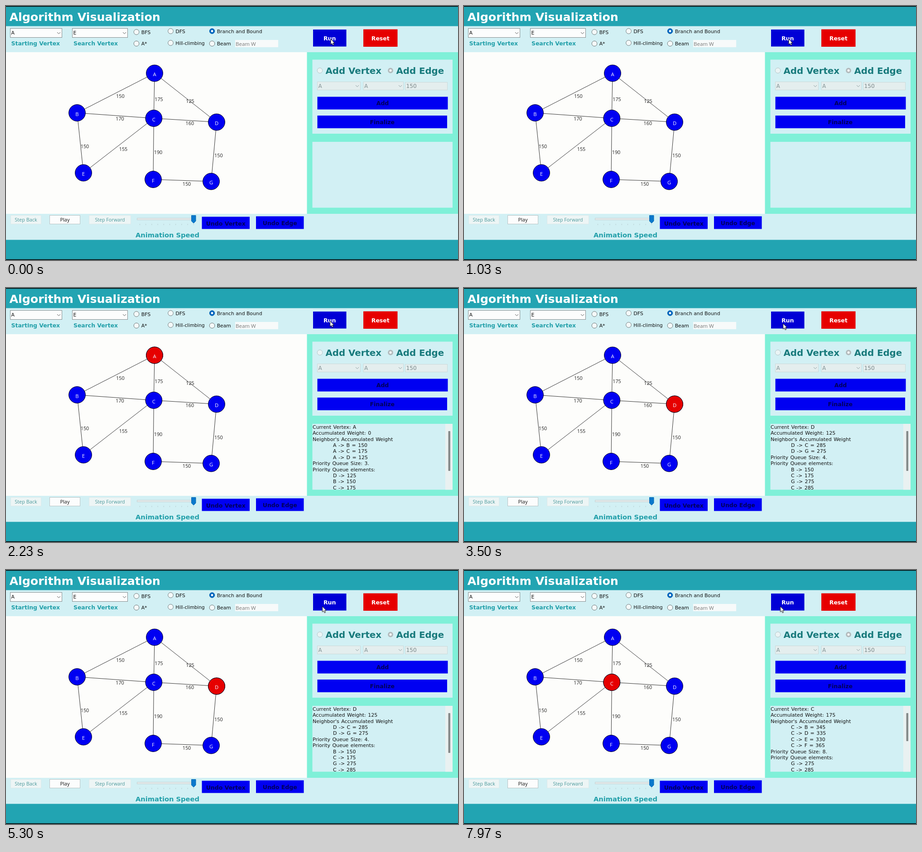
Animation, 998 px wide and 561 px high, one loop 8000 ms. Source, as an HTML page:

```html
<!DOCTYPE html>
<html lang="en">
<head>
<meta charset="utf-8">
<title>Algorithm Visualization</title>
<style>
html, body { margin: 0; width: 100%; height: 100%; overflow: hidden; background: #000; }
svg { display: block; width: 998px; height: 561px; }
text { font-family: "DejaVu Sans", sans-serif; white-space: pre; }
.bold { font-weight: bold; }
.ui { font-family: "Open Sans", "Noto Sans", sans-serif; }
.mid { text-anchor: middle; }
.log { word-spacing: 1px; }
.state { visibility: hidden; animation: 8s step-end infinite; }
#stateA { animation-name: showA; }
#stateD { animation-name: showD; }
#stateB { animation-name: showB; }
#stateC { animation-name: showC; }
@keyframes showA { 0% { visibility: hidden } 17.5% { visibility: visible } 42.5%, 100% { visibility: hidden } }
@keyframes showD { 0% { visibility: hidden } 42.5% { visibility: visible } 67.5%, 100% { visibility: hidden } }
@keyframes showB { 0% { visibility: hidden } 67.5% { visibility: visible } 92.5%, 100% { visibility: hidden } }
@keyframes showC { 0% { visibility: hidden } 92.5%, 100% { visibility: visible } }
#cursor { animation: drift 8s linear infinite; }
@keyframes drift {
  0%, 17% { transform: translate(717px, 73px) }
  22%, 30% { transform: translate(715.5px, 73px) }
  42%, 44% { transform: translate(704.5px, 78.5px) }
  52%, 100% { transform: translate(698.5px, 80.5px) }
}
</style>
</head>
<body>
<svg id="stage" viewBox="0 0 998 561"></svg>
<script>
const TEAL = '#22a4b2', PALE = '#d2f0f4', MINT = '#7ff0d8', BLUE = '#0000f2', RED = '#e60000';
const INK = '#111', LABEL = '#219fa9', FADED = '#8a9a9c', NAVY = '#00005c';

const box = (x1, y1, x2, y2, fill, extra = '') =>
  `<rect x="${x1}" y="${y1}" width="${x2 - x1}" height="${y2 - y1}" fill="${fill}" ${extra}/>`;
const text = (x, y, size, str, fill = INK, cls = '') =>
  `<text x="${x}" y="${y}" font-size="${size}" fill="${fill}" class="${cls}">${str.replace(/>/g, '&gt;')}</text>`;
const path = (d, stroke, fill = 'none') => `<path d="${d}" stroke="${stroke}" fill="${fill}"/>`;
const ring = (x, y, r, fill, stroke, width = 1) =>
  `<circle cx="${x}" cy="${y}" r="${r}" fill="${fill}" stroke="${stroke}" stroke-width="${width}"/>`;

const combo = (x1, y1, x2, y2, value, size, fill, border, ink) =>
  box(x1 + .5, y1 + .5, x2 - .5, y2 - .5, fill, `stroke="${border}"`) +
  text(x1 + 2.5, (y1 + y2) / 2 + size * .37, size, value, ink) +
  path(`M${x2 - 11} ${(y1 + y2) / 2 - 1.5}l3.5 3.5 3.5 -3.5`, ink === INK ? '#555' : ink);

const radio = (x, y, label, size = 10.8, on = false) =>
  (on ? ring(x, y, 5.7, '#0067c0', '#005fb0') + ring(x, y, 2.4, '#fff', 'none')
      : ring(x, y, 5.8, '#f4fafa', '#70787a')) +
  text(x + 10.7, y + 4.3, size, label);

const button = (x1, y1, x2, y2, label, fill, ink, size = 12.5, cls = 'bold', border = 'none', dy = 0) =>
  box(x1 + .5, y1 + .5, x2 - .5, y2 - .5, fill, `stroke="${border}"`) +
  text((x1 + x2) / 2, (y1 + y2) / 2 + size * .36 + dy, size, label, ink, cls + ' mid');

function panels() {
  return box(0, 1.5, 998, 45, TEAL) + box(0, 44.5, 998, 102, PALE) +
    box(0, 102, 665, 459, '#fdfdfb') + box(664.5, 102, 998, 459, MINT) +
    box(676.5, 118.5, 986, 282, PALE) + box(676.5, 300, 986, 445.5, PALE) +
    box(0, 459, 998, 517, PALE) + box(0, 516.5, 998, 559.5, TEAL);
}

function toolbar() {
  return text(7.5, 33, 25.3, 'Algorithm Visualization', '#fff', 'bold') +
    combo(9, 49, 124, 70, 'A', 10.8, '#fcfdfd', '#858c8e', INK) +
    combo(146, 49, 269, 70, 'E', 10.8, '#fcfdfd', '#858c8e', INK) +
    text(11.5, 87, 12.45, 'Starting Vertex', LABEL, 'bold') +
    text(149, 87, 12.4, 'Search Vertex', LABEL, 'bold') +
    radio(288, 57.5, 'BFS', 11) + radio(288, 83, 'A*') +
    radio(363.5, 55.5, 'DFS', 11) + radio(363.5, 81.5, 'Hill-climbing', 10.4) +
    radio(455, 55.5, 'Branch and Bound', 10.8, true) + radio(455, 83, 'Beam') +
    box(506, 75, 601, 91, '#f7fafa') + text(507, 87.5, 11.5, 'Beam W', '#777', 'ui') +
    button(677.5, 51.5, 752, 90, 'Run', '#0000d6', '#fff', 12.6, 'bold', 'none', .7) +
    button(788.5, 51, 865, 90.5, 'Reset', RED, '#fff', 12.5, 'bold', 'none', .7);
}

function editor() {
  const ink = '#187a7c', field = '#e4eeee', rim = '#ccd9da';
  return ring(693, 142.5, 5.8, '#eaf4f5', '#b4c4c6') + text(705.5, 150.2, 19.8, 'Add Vertex', ink, 'bold') +
    ring(849, 142.5, 4.3, '#f4f6f6', '#b2babc', 3.2) +
    text(861.5, 150.2, 19.75, 'Add Edge', ink, 'bold') +
    combo(687, 167, 783, 186, 'A', 12, field, rim, FADED) +
    combo(788.5, 167, 878, 186, 'A', 12, field, rim, FADED) +
    box(881.5, 168.5, 974.5, 185.5, field, `stroke="${rim}"`) + text(883.5, 181.2, 12.2, '150', '#7d898b') +
    button(687, 200, 976, 229, 'Add', BLUE, NAVY) +
    button(687, 241.5, 974.5, 270.5, 'Finalize', BLUE, NAVY, 12.5, 'bold', 'none', .5);
}

function playback() {
  let ticks = '';
  for (let i = 0; i < 10; i++) ticks += `M${295.5 + i * 13.2} 481v3`;
  return button(10, 462, 78, 482, 'Step Back', '#edf5f5', '#4b999c', 10.9, 'ui', '#dde9ea') +
    button(96, 462, 164, 482, 'Play', '#fcfdfd', INK, 10.9, 'ui', '#b9c3c5') +
    button(183, 462, 276, 482, 'Step Forward', '#edf5f5', '#4b999c', 10.7, 'ui', '#dde9ea') +
    box(289.5, 468.5, 417.5, 472.5, '#e4eaea', 'stroke="#c6d2d4"') + path(ticks, '#b9cfd2') +
    path('M409.5 462.5h9.5v12.5l-4.75 4.8l-4.75 -4.8z', '#0a6cb4', '#0a78cc') +
    text(286, 511, 14.65, 'Animation Speed', LABEL, 'bold') +
    button(432, 465, 538.5, 493, 'Undo Vertex', BLUE, NAVY, 12.5, 'bold', 'none', 1) +
    button(551.5, 464, 658, 493, 'Undo Edge', BLUE, NAVY, 12.5, 'bold', 'none', .8);
}

const nodes = {
  A: [328, 148.5], B: [157, 236], C: [326.3, 248], D: [465, 256.5],
  E: [171, 368.5], F: [325, 383], G: [453, 387.5]
};
// pair, weight, label centre
const edges = [
  ['AB', 150, 252.3, 199], ['AC', 175, 337.5, 206], ['AD', 125, 406.5, 210], ['BC', 170, 251.5, 249],
  ['CD', 160, 405.8, 259], ['BE', 150, 174, 309.5], ['CE', 155, 259, 316], ['CF', 190, 336, 323],
  ['FG', 150, 399, 393], ['DG', 150, 469.3, 329.5]
];

const vertex = (name, fill) => {
  const [x, y] = nodes[name];
  return ring(x, y, 18.4, fill, '#000018') + text(x, y + 6.6, 11.3, name, '#f2f2ff', 'ui mid');
};

function graph() {
  const lines = edges.map(([pair]) => path(`M${nodes[pair[0]]}L${nodes[pair[1]]}`, '#333'));
  const weights = edges.map(([, w, x, y]) => text(x, y + 4, 10.8, String(w), '#222', 'ui mid'));
  return lines.join('') + weights.join('') + Object.keys(nodes).map(n => vertex(n, BLUE)).join('');
}

// Search steps: vertex, path cost, neighbours, queue size, visible queue head, scrollbar end
const steps = [
  ['A', 0, 'B = 150,C = 175,D = 125', 3, 'D -> 125,B -> 150,C -> 175', 404],
  ['D', 125, 'C = 285,G = 275', 4, 'B -> 150,C -> 175,G -> 275,C -> 285', 404],
  ['B', 150, 'C = 320,E = 300', 5, 'C -> 175,G -> 275,C -> 285,E -> 300', 398],
  ['C', 175, 'B = 345,D = 335,E = 330,F = 365', 8, 'G -> 275,C -> 285', 378]
];

function step([name, cost, neighbours, size, queue, barEnd]) {
  const indent = s => '\t' + s;
  const lines = [
    `Current Vertex: ${name}`, `Accumulated Weight: ${cost}`, "Neighbor's Accumulated Weight",
    ...neighbours.split(',').map(n => indent(`${name} -> ${n}`)),
    `Priority Queue Size: ${size}.`, 'Priority Queue elements:',
    ...queue.split(',').map(indent)
  ];
  const log = lines.map((line, i) =>
    text(line[0] === '\t' ? 722 : 677, 311 + i * 13.37, 10.95, line.trim(), INK, 'log')).join('');
  return `<g class="state" id="state${name}">${vertex(name, RED)}${log}` +
    box(970, 300, 986, 445.5, '#e9f1f1') + box(976.5, 316, 981, barEnd, '#858b8b', 'rx="1"') + '</g>';
}

const cursor = '<g id="cursor">' +
  path('M0 0V12.2L2.8 9.6L4.8 14L6.9 13.1L5 8.8H8.8Z', '#111', '#fff') + '</g>';

document.getElementById('stage').innerHTML =
  panels() + toolbar() + editor() + playback() + graph() + steps.map(step).join('') + cursor;
</script>
</body>
</html>
```
